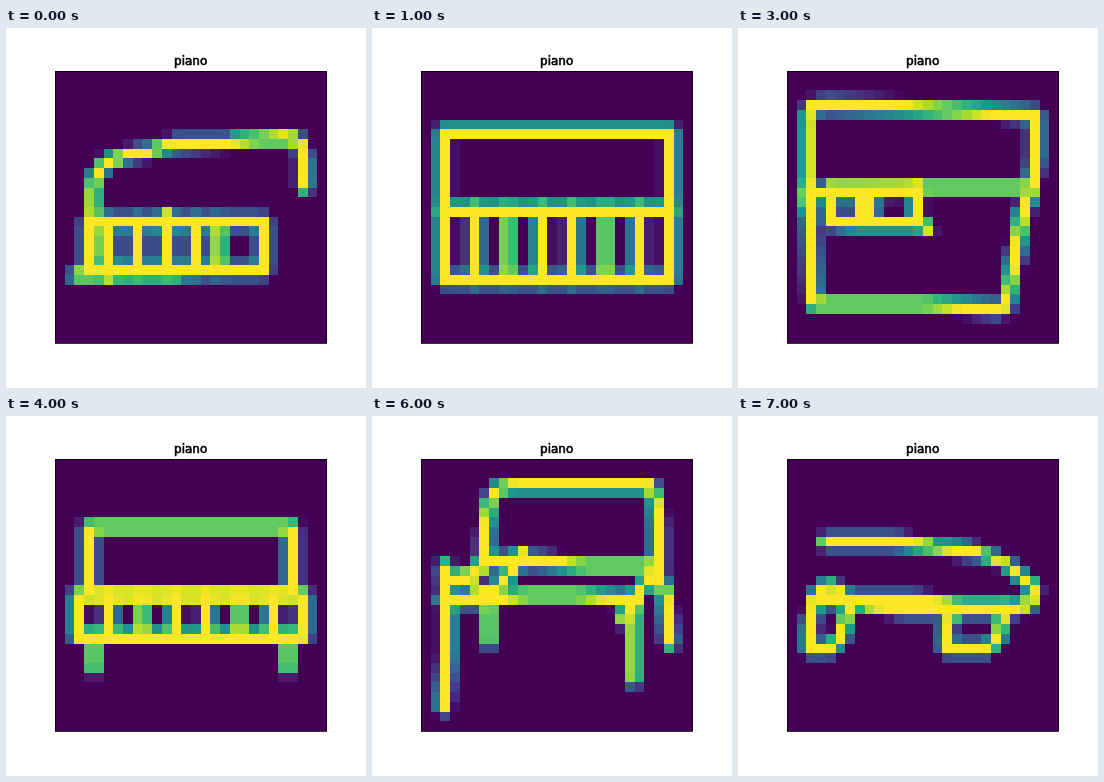
Animation, 360 px wide and 360 px high, one loop 8000 ms. Source, as an HTML page with a canvas:

```html
<!DOCTYPE html>
<html lang="en">
<head>
<meta charset="utf-8">
<title>piano</title>
<style>
  html, body { margin: 0; width: 100%; height: 100%; overflow: hidden; background: #fff; }
  canvas, svg { position: absolute; left: 0; top: 0; width: 360px; height: 360px; }
  text { font: 12px "DejaVu Sans", sans-serif; text-anchor: middle; stroke: #000; stroke-width: .6px; }
  rect { fill: none; stroke: #000; stroke-width: .8; }
</style>
</head>
<body>
<canvas id="plot" width="360" height="360"></canvas>
<svg viewBox="0 0 360 360">
  <rect x="49.5" y="43.5" width="271" height="272"/>
  <text x="184.7" y="37">piano</text>
</svg>
<script>
const GRID = 28, CELL = 9.71, HOLD = 1000;
const PEN = 16 / 304 * GRID;

const box = (left, top, right, bottom) => `M${left} ${top}H${right}V${bottom}H${left}Z`;

// A row of evenly spaced piano keys.
const keys = (first, step, count, top, bottom) =>
  Array.from({ length: count }, (_, i) => `M${first + i * step} ${top}V${bottom}`);

// Pen strokes in grid units.
const longGrand = [
  'M3.9 19V12Q4 8.6 10 8.2Q11 7.4 18 7.3L24.2 6.8Q25.65 7 25.65 9V11.9',
  box(3.5, 15.5, 21.5, 20.5),
  'M2.2 21.1L6 20.7 13 20.65',
  ...keys(5.5, 3, 4, 15.5, 20.5),
  'M11.5 14.8V16', 'M5.6 20V21', 'M16.9 15.6V20.4'
];

const wideUpright = [
  box(2.3, 6.3, 25.7, 21.6), 'M2.3 14.3H25.7',
  ...keys(5.6, 3.35, 6, 14.3, 21.6)
];

const openGrand = [
  'M2.5 21.2V14Q1.4 9.4 4 9.4Q6 9.6 5.5 11.8',
  'M4.4 9.5V12L2.8 13.5 3.4 16 4.5 18V21.1',
  'M4.5 12.6L6.5 12.4V9.2L8 8.6H20.5L25.6 9.5V20.4',
  'M8.3 9L8.6 20.4', 'M9.8 9.6H13.8', 'M13.6 6.9V9', 'M16.2 8.6V15.8',
  'M20.3 9L21.6 11.2H24L24.5 9.6',
  'M4.4 21L11 20.9 14 20.5 25.6 20.3'
];

const deskPiano = [
  'M2.2 14V4.2Q2.2 3.6 4 3.6L12 3.7 25.6 4.5V9L25.2 12.2 24.3 14.5 22.6 24.2',
  'M2.3 12L2.7 24 14 24.1 22 24.4',
  'M4.6 12H24.4', 'M2.5 12.6L13.4 12.2',
  'M4.5 12.3V15.5L7 15.75H14L14.4 16.2',
  ...keys(7.5, 1.1, 2, 13, 15), 'M13.3 12V15'
];

const lowUpright = [
  box(3.5, 6.9, 24.4, 14), box(2.3, 14, 25.6, 18.2),
  ...keys(5.6, 3.35, 6, 14, 18.2), ...keys(4, 20, 2, 18.2, 21.4)
];

const proppedLid = [
  'M3.4 17.6L8.2 10 11.6 5.1H12.2L15.5 8.6 17.5 11.5 19.5 15.8V18',
  'M2.4 22.4V18.4H17L21 17.5H25.4',
  'M2.5 22.4H4.4V18.2', 'M6 18H14',
  'M22.3 17.3L25.5 16.7V21L20 22.2 15 22.9 7 23.2 4 23.4',
  'M9.2 18.8V22.5', 'M15.5 16.8V22.3',
  ...keys(18, 2.5, 3, 17.8, 21.6)
];

const benchPiano = [
  'M6.6 11V8L7 4.5Q7.3 2.75 9.5 2.75H23.7Q24.4 4 24.4 7V12L25.2 14 25.6 19',
  'M6.5 10.5H12L17 10.9H24.3',
  'M2.3 14.5H6L11 14 16 14.1 22.3 14.5',
  'M2.5 11L2.7 15V20L2.3 25.6',
  'M2.8 12.2H4.6L7 14.2 9.4 11.4 10.4 9.7', 'M4.5 12.4L6.4 10.8',
  'M7 14.2V18.7', 'M20.8 16.4L22.2 14 24.2 11.5', 'M21.9 15V22.7'
];

const sideGrand = [
  'M3.9 8.5H11L15 9.1 19 9.4Q23 10.3 25.4 13.2Q25.6 15.4 23 15.5H12L8 15',
  'M2.8 14.4H13L17 14.9 23 15.3',
  'M6.5 14.8L5.5 18.5 4.5 19.4H2.3Q2.4 13.5 4.2 12.9Q5.5 13 6.5 15',
  'M17.2 15.5L16.4 17.5V19.4L20.6 19.5 21.7 18.4 22.4 15.6'
];

const sketches = [longGrand, wideUpright, openGrand, deskPiano, lowUpright, proppedLid, benchPiano, sideGrand];

const viridis = ['440154', '482878', '3e4989', '31688e', '26828e', '1f9e89', '35b779', '6ece58', 'b5de2b', 'fde725']
  .map(hex => [0, 2, 4].map(i => parseInt(hex.slice(i, i + 2), 16)));

function shade(level) {
  const p = level * (viridis.length - 1);
  const i = Math.min(Math.floor(p), viridis.length - 2);
  const mix = viridis[i].map((c, k) => Math.round(c + (viridis[i + 1][k] - c) * (p - i)));
  return `rgb(${mix})`;
}

const small = document.createElement('canvas');
small.width = small.height = GRID;
const pen = small.getContext('2d', { willReadFrequently: true });
pen.lineWidth = PEN;
pen.lineCap = pen.lineJoin = 'round';

// Antialiased coverage of each grid cell.
function rasterize(strokes) {
  pen.clearRect(0, 0, GRID, GRID);
  for (const stroke of strokes) pen.stroke(new Path2D(stroke));
  return pen.getImageData(0, 0, GRID, GRID).data.filter((_, i) => i % 4 === 3);
}

const bitmaps = sketches.map(rasterize);
const plot = document.getElementById('plot').getContext('2d');
const edge = (center, i) => Math.round(center + (i - GRID / 2) * CELL);

function paint(bitmap) {
  bitmap.forEach((level, i) => {
    const col = i % GRID, row = Math.floor(i / GRID);
    const x = edge(185, col), y = edge(179, row);
    plot.fillStyle = shade(level / 255);
    plot.fillRect(x, y, edge(185, col + 1) - x, edge(179, row + 1) - y);
  });
}

const start = performance.now();
let shown = -1;
function tick() {
  const index = Math.floor((performance.now() - start) / HOLD) % bitmaps.length;
  if (index !== shown) paint(bitmaps[shown = index]);
  requestAnimationFrame(tick);
}
tick();
</script>
</body>
</html>
```
